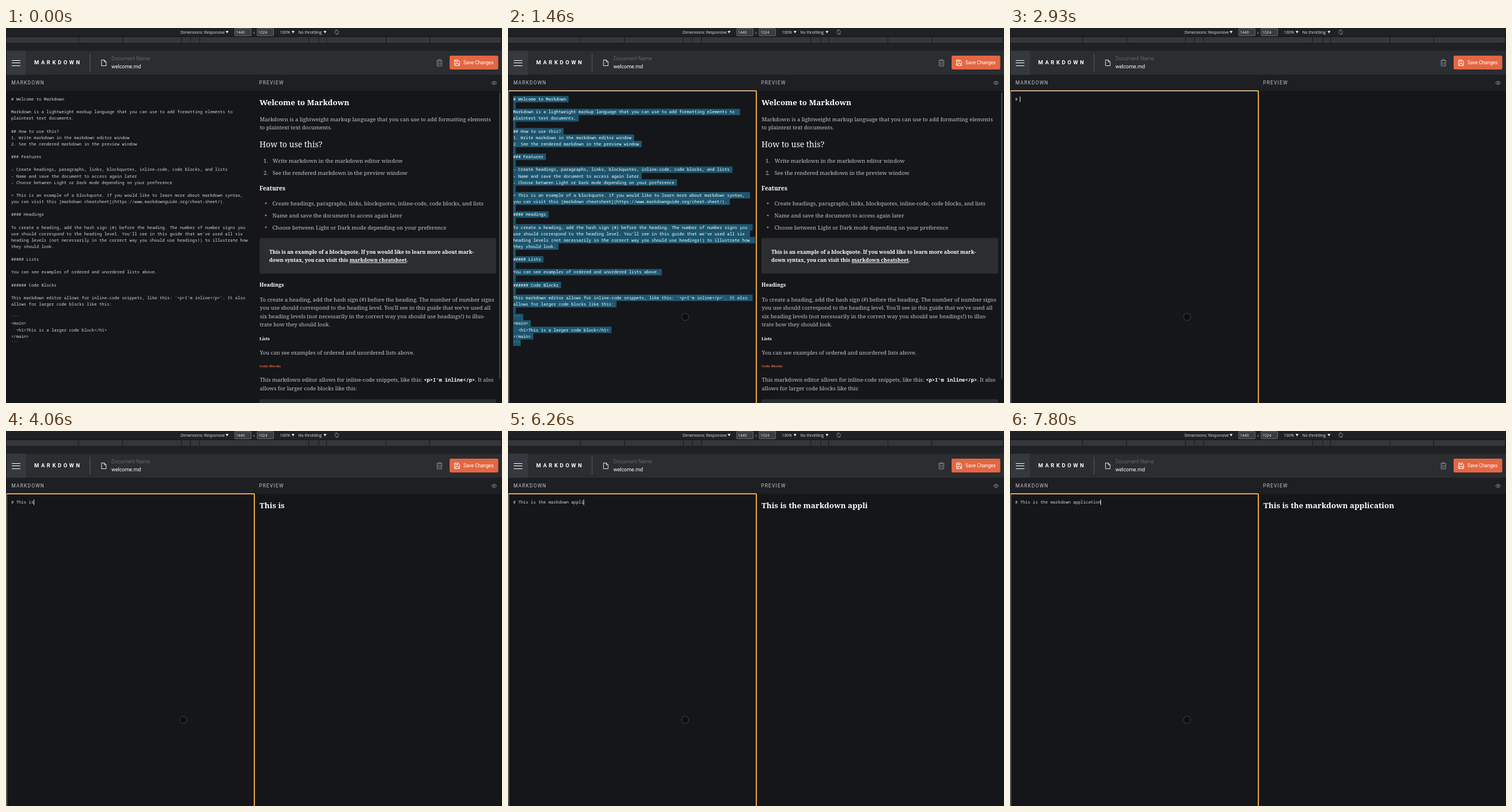
Animation of 861 by 651 pixels, one loop 8 s. Source, as an HTML page:

```html
<!DOCTYPE html>
<html lang="en">
<head>
<meta charset="utf-8">
<title>Markdown editor</title>
<style>
html, body { margin: 0; height: 100%; overflow: hidden; background: #151619; }
svg { display: block; width: 100vw; height: 100vh; }
text { white-space: pre; }
.tools { font: 6.8px "Open Sans", "Noto Sans", sans-serif; fill: #e3e4e6; }
.ui { font: 8.97px Roboto, sans-serif; fill: #fff; }
.brand { font-weight: 700; font-size: 9.4px; letter-spacing: 3.6px; }
.label { font-size: 8.37px; letter-spacing: 1.2px; fill: #c1c4cb; }
.button { font-size: 8.37px; }
.dim { font-weight: 300; fill: #7c8187; }
.mono { font: 7.29px "Noto Sans Mono", monospace; fill: #d3d5d9; }
.mono.on { fill: #fff; }
.slab { font: 9.41px "Noto Serif", serif; fill: #c1c4cb; }
.slab .b, .b { font-weight: 700; fill: #fff; }
.h1 { font-size: 13.4px; }
.h2 { font-size: 14px; font-weight: 300; fill: #fff; }
.h3 { font-size: 10.2px; }
.h4 { font-size: 9.02px; }
.h5 { font-size: 7.5px; }
.h6 { font-size: 6.13px; }
.slab .h6 { fill: #e46643; }
.quote { font-size: 8.84px; }
.link { text-decoration: underline; }
.code { font: 700 8.72px "Noto Sans Mono", monospace; fill: #fff; }
.line { fill: none; stroke: #fff; }
</style>
</head>
<body>
<svg viewBox="0 0 861 651">
  <!-- device toolbar -->
  <rect width="861" height="40" fill="#202124"/>
  <path d="M0 14.5H861M0 26.5H861" stroke="#17181a"/>
  <rect x="1" y="16" width="858" height="10" fill="#35363a"/>
  <path d="M126 16v10M202.5 16v10M304.5 16v10M320 16v10M336 16v10M525.5 16v10M543 16v10M556.5 16v10M659.5 16v10M735.5 16v10" stroke="#17181a"/>
  <g fill="#3b3c3f" stroke="#77787b" stroke-width=".8">
    <rect x="397" y="1" width="28.5" height="12.5" rx="1"/>
    <rect x="436" y="1" width="28.5" height="12.5" rx="1"/>
  </g>
  <g class="tools">
    <text x="303" y="10">Dimensions: Responsive</text>
    <text x="399" y="10">1440</text>
    <text x="428.5" y="10.5" fill="#9a9b9e">×</text>
    <text x="438" y="10">1024</text>
    <text x="475.5" y="10">100%</text>
    <text x="507.5" y="10">No throttling</text>
    <path d="M381.3 5h5l-2.5 4.6zM495.8 5h5l-2.5 4.6zM551.3 5h5l-2.5 4.6z"/>
  </g>
  <g class="line" style="stroke:#9a9b9e" stroke-width=".8">
    <rect x="572" y="4" width="4.2" height="6.4" rx=".6" transform="rotate(45 574 7.2)"/>
    <path d="M570.4 5.5A4 4 0 0 1 575 3.3M577.7 8.9A4 4 0 0 1 573.1 11"/>
  </g>

  <!-- app header -->
  <rect x="1" y="39.5" width="860" height="42" fill="#2b2d31"/>
  <rect x="1" y="39.5" width="33.5" height="42" fill="#35393f"/>
  <path class="line" d="M10 56.5H25M10 60.5H25M10 65.5H25"/>
  <path d="M146 45V75.5" stroke="#5a6069"/>
  <path class="line" d="M165.8 55.5h5l3 3v7h-8zM170.5 55.5v3.2h3.2" stroke-width=".9"/>
  <g class="line" style="stroke:#8a8e95" stroke-width="1">
    <path d="M747.3 56.7H757.5M750.3 56.5v-1.6h4.2v1.6M748.5 57v9h7.8v-9M750.9 59v5M753.9 59v5"/>
  </g>
  <rect x="770" y="48" width="84.5" height="24" rx="2.4" fill="#e46643"/>
  <path class="line" d="M778.7 55.7h6.4l2.3 2.3v7.2h-8.7zM780.7 55.7v2.7h3.7v-2.7M780.7 65v-3.6h4.8v3.6"/>
  <g class="ui">
    <text class="brand" x="49" y="63.4">MARKDOWN</text>
    <text class="dim" x="183" y="56.3">Document Name</text>
    <text x="183" y="69.9">welcome.md</text>
    <text class="button" x="794" y="63">Save Changes</text>
  </g>

  <!-- panel titles -->
  <rect x="1" y="81.5" width="860" height="28" fill="#1d1f22"/>
  <g class="ui">
    <text class="label" x="9.5" y="98">MARKDOWN</text>
    <text class="label" x="439.2" y="98">PREVIEW</text>
  </g>
  <g class="line" style="stroke:#8a8e95" stroke-width=".9">
    <path d="M842.7 95.3q4.5-5.8 9.2 0q-4.7 5.8-9.2 0z"/>
    <circle cx="847.3" cy="95.3" r="1.5"/>
  </g>

  <g id="editor"></g>

  <!-- rendered welcome document -->
  <g id="preview" class="slab">
    <text class="b h1" x="440" y="134">Welcome to Markdown</text>
    <text x="440.5" y="162">Markdown is a lightweight markup language that you can use to add formatting elements</text>
    <text x="440.5" y="176.4">to plaintext text documents.</text>
    <text class="h2" x="440" y="207">How to use this?</text>
    <text x="447" y="234.3">1.</text>
    <text x="462.7" y="234.3">Write markdown in the markdown editor window</text>
    <text x="447" y="254.7">2.</text>
    <text x="462.7" y="254.7">See the rendered markdown in the preview window</text>
    <text class="b h3" x="440" y="282.2">Features</text>
    <g fill="#e46643">
      <circle cx="451" cy="304.3" r="1.5"/>
      <circle cx="451" cy="325.2" r="1.5"/>
      <circle cx="451" cy="346.1" r="1.5"/>
    </g>
    <text x="462.5" y="307.7">Create headings, paragraphs, links, blockquotes, inline-code, code blocks, and lists</text>
    <text x="462.5" y="328.6">Name and save the document to access again later</text>
    <text x="462.5" y="349.5">Choose between Light or Dark mode depending on your preference</text>
    <rect x="440" y="364.5" width="411" height="62" rx="2.4" fill="#2b2d31"/>
    <text class="b quote" x="457" y="391.7">This is an example of a blockquote. If you would like to learn more about mark-</text>
    <text class="b quote" x="457" y="406.1">down syntax, you can visit this <tspan class="link">markdown cheatsheet</tspan>.</text>
    <text class="b h4" x="440" y="448.8">Headings</text>
    <text x="440.5" y="474.8">To create a heading, add the hash sign (#) before the heading. The number of number signs</text>
    <text x="440.5" y="489.2">you use should correspond to the heading level. You'll see in this guide that we've used all</text>
    <text x="440.5" y="503.6">six heading levels (not necessarily in the correct way you should use headings!) to illus-</text>
    <text x="440.5" y="518">trate how they should look.</text>
    <text class="b h5" x="440" y="541.8">Lists</text>
    <text x="440.5" y="566.7">You can see examples of ordered and unordered lists above.</text>
    <text class="b h6" x="440" y="589">Code Blocks</text>
    <text x="440.5" y="614">This markdown editor allows for inline-code snippets, like this: <tspan class="code">&lt;p&gt;I'm inline&lt;/p&gt;</tspan>. It also</text>
    <text x="440.5" y="628.6">allows for larger code blocks like this:</text>
    <rect x="440" y="644.5" width="411" height="20" rx="2.4" fill="#2b2d31"/>
    <rect x="856.3" y="112" width="1.7" height="497" rx=".8" fill="#4a4c50"/>
  </g>

  <!-- typed document -->
  <g class="slab"><text id="title" class="b h1" x="440" y="134"></text></g>
  <text id="typed" class="mono" x="9" y="126"></text>

  <g id="focus">
    <path d="M1.2 109V651" stroke="#b9b2a6" stroke-width=".9"/>
    <path d="M1 108.6H431" stroke="#e9dfcf" stroke-width=".8"/>
    <path d="M1 109.5H432" stroke="#f3ad41"/>
    <path d="M431.1 109V651" stroke="#fdb544" stroke-width="1.9"/>
  </g>
  <rect id="caret" width="1" height="9.5" fill="#e8e9eb"/>
  <circle id="pointer" r="6.2" fill="#0d0e10" stroke="#414246"/>
</svg>
<script>
const LOOP = 8000, CHAR = 4.375, ROW = 11.125, LEFT = 9, TOP = 123.5;
const FOCUS = 560, SELECT = 1460, CLEAR = 1720;

const lines = `# Welcome to Markdown

Markdown is a lightweight markup language that you can use to add formatting elements to
plaintext text documents.

## How to use this?
1. Write markdown in the markdown editor window
2. See the rendered markdown in the preview window

### Features

- Create headings, paragraphs, links, blockquotes, inline-code, code blocks, and lists
- Name and save the document to access again later
- Choose between Light or Dark mode depending on your preference

> This is an example of a blockquote. If you would like to learn more about markdown syntax,
you can visit this [markdown cheatsheet](https://www.markdownguide.org/cheat-sheet/).

#### Headings

To create a heading, add the hash sign (#) before the heading. The number of number signs you
use should correspond to the heading level. You'll see in this guide that we've used all six
heading levels (not necessarily in the correct way you should use headings!) to illustrate how
they should look.

##### Lists

You can see examples of ordered and unordered lists above.

###### Code Blocks

This markdown editor allows for inline-code snippets, like this: \`<p>I'm inline</p>\`. It also
allows for larger code blocks like this:

\`\`\`
<main>
  <h1>This is a larger code block</h1>
</main>
\`\`\``.split('\n');

const sentence = '# This is the markdown application';
// [time, characters typed so far]
const keys = [
  [CLEAR, 0], [2590, 1], [2790, 2], [3660, 3], [3730, 5], [3860, 7],
  [4000, 8], [4060, 9], [4130, 10], [4200, 11], [4260, 12], [4330, 13], [4390, 14],
  [4730, 15], [4800, 16], [4860, 17], [4930, 18], [5000, 19], [5060, 20],
  [5130, 21], [5200, 22], [5330, 23], [5530, 24], [5860, 25], [5990, 26],
  [6260, 28], [6330, 29], [6400, 30], [6460, 31], [6530, 32], [6660, 33], [6730, 34]
];

const $ = id => document.getElementById(id);
const show = (el, on) => el.setAttribute('visibility', on ? 'visible' : 'hidden');

function add(parent, tag, attrs, text = '') {
  const el = document.createElementNS('http://www.w3.org/2000/svg', tag);
  for (const name in attrs) el.setAttribute(name, attrs[name]);
  el.textContent = text;
  return parent.appendChild(el);
}

const marks = add($('editor'), 'g', { fill: '#1d5670' });
const source = add($('editor'), 'g', { class: 'mono' });
lines.forEach((line, i) => {
  const y = TOP + i * ROW;
  const extra = i === lines.length - 1 ? 0 : line.length > 87 ? 2 : 1;
  add(marks, 'rect', { x: LEFT, y: y - 5.5, width: (line.length + extra) * CHAR, height: ROW });
  add(source, 'text', { x: LEFT, y: y + 2.5 }, line);
});

function placeCaret(column, row, age) {
  $('caret').setAttribute('x', Math.floor(LEFT - 0.1 + column * CHAR));
  $('caret').setAttribute('y', TOP - 4.5 + row * ROW);
  show($('caret'), age % 1000 < 500);
}

function draw(t) {
  const cleared = t >= CLEAR, selected = t >= SELECT && !cleared;
  show($('editor'), !cleared);
  show($('preview'), !cleared);
  marks.style.display = selected ? '' : 'none';
  source.setAttribute('class', selected ? 'mono on' : 'mono');
  show($('focus'), t >= FOCUS);

  const [time, count] = keys.filter(k => k[0] <= t).pop() || [0, 0];
  const typed = sentence.slice(0, count);
  $('typed').textContent = typed;
  $('title').textContent = typed.slice(2).trim();

  if (cleared) placeCaret(count, 0, t - time);
  else if (t >= FOCUS && !selected) placeCaret(3, 34, t - FOCUS);
  else show($('caret'), false);

  const rest = (1 - Math.min(1, Math.max(0, (t - 200) / 330))) ** 2;
  $('pointer').setAttribute('cx', 307.5 + 435 * rest);
  $('pointer').setAttribute('cy', 501.5 + 142 * rest);
  show($('pointer'), t >= 200);
}

const start = performance.now();
function tick() {
  draw((performance.now() - start) % LOOP);
  requestAnimationFrame(tick);
}
tick();
</script>
</body>
</html>
```
